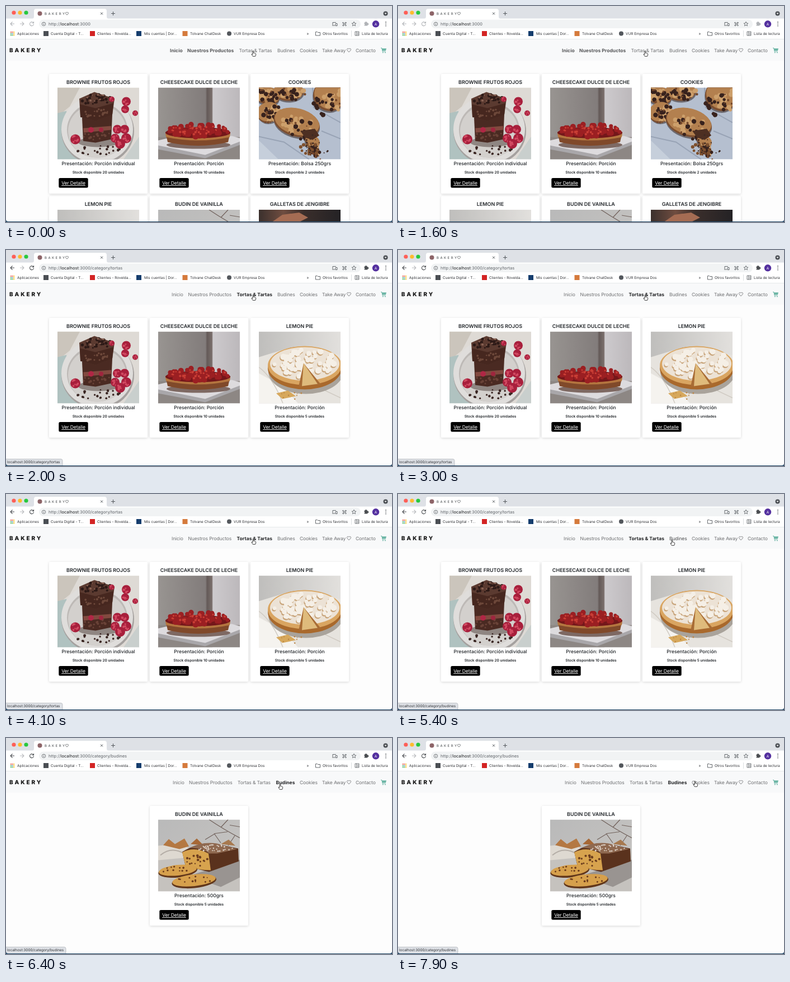
Animation of 690 by 388 pixels, one loop 8000 ms. Source, as an HTML page:

```html
<!DOCTYPE html>
<html lang="es">
<head>
<meta charset="utf-8">
<title>Bakery</title>
<style>
  html, body { margin: 0; width: 100%; height: 100%; overflow: hidden; background: #fdfdfd; }
  svg { display: block; }
  #stage { width: 690px; height: 388px; }
  text { font-family: Inter, Roboto, sans-serif; text-rendering: geometricPrecision; fill: #212529; white-space: pre; }
  .tab { font-size: 6px; letter-spacing: .4px; fill: #3c4043; }
  .url { font-size: 7.5px; letter-spacing: .02px; fill: #5f6368; }
  .host { fill: #202124; }
  .small { font-size: 6.45px; fill: #303236; }
  .brand { font-size: 10px; font-weight: 800; letter-spacing: 2.9px; fill: #111; }
  .nav { font-size: 8.5px; letter-spacing: -.11px; fill: #6f7072; }
  .bold { font-weight: 700; letter-spacing: .04px; fill: #555658; }
  .active { font-weight: 700; letter-spacing: .04px; fill: #222325; }
  .hover { fill: #4b4c4e; }
  .loading { font-size: 16.4px; font-weight: 500; letter-spacing: -.3px; }
  .title { font-size: 9px; font-weight: 600; }
  .size { font-size: 8.6px; font-weight: 500; letter-spacing: -.03px; }
  .stock { font-size: 6.5px; font-weight: 600; }
  .button { font-size: 8.5px; letter-spacing: -.1px; fill: #fff; text-decoration: underline; }
  .title, .size, .stock, .button, .loading { text-anchor: middle; }
</style>
</head>
<body>
<svg id="stage" viewBox="0 0 690 388">
  <defs>
    <filter id="shadow" x="-10%" y="-10%" width="120%" height="120%">
      <feDropShadow dx="0" dy="1" stdDeviation="2.2" flood-opacity=".15"/>
    </filter>
    <linearGradient id="wall">
      <stop stop-color="#989491"/><stop offset=".58" stop-color="#827c7b"/>
      <stop offset=".6" stop-color="#645a58"/><stop offset=".66" stop-color="#7b706d"/>
      <stop offset=".67" stop-color="#cdcacd"/><stop offset="1" stop-color="#bcb8bb"/>
    </linearGradient>
    <linearGradient id="grey" y2="1"><stop stop-color="#b9b9b9"/><stop offset="1" stop-color="#c9c7c4"/></linearGradient>
    <linearGradient id="linen"><stop stop-color="#bfbebc"/><stop offset="1" stop-color="#e2e0dd"/></linearGradient>
    <linearGradient id="kitchen">
      <stop stop-color="#3b302d"/><stop offset=".3" stop-color="#6f4d40"/>
      <stop offset=".55" stop-color="#3a2e2b"/><stop offset="1" stop-color="#242225"/>
    </linearGradient>
  </defs>
  <g id="chrome"></g>
  <g id="page"></g>
  <g id="status"></g>
  <path d="M0 383q0 4 4 4H686q4 0 4-4V388H0Z" fill="#1d4464"/>
  <path id="cursor" d="M-1.600 1.500V-4q0-1 .8-1t.8 1V-1q1.200-.4 1.400.4 1.100-.3 1.300.5 1.200-.1 1.200 1V2.500l-1 2.500h-4.300L-3.700 1.500q0-1 .9-.7Z" fill="#fff" stroke="#111" stroke-width=".8"/>
</svg>
<script>
const $ = id => document.getElementById(id);
const text = (x, y, s, cls) => `<text x="${x}" y="${y}" class="${cls}">${s.replace('&', '&amp;')}</text>`;
const rect = (x, y, w, h, fill, r = 0) => `<rect x="${x}" y="${y}" width="${w}" height="${h}" rx="${r}" fill="${fill}"/>`;
const oval = (x, y, rx, ry, fill, extra = '') => `<ellipse cx="${x}" cy="${y}" rx="${rx}" ry="${ry}" fill="${fill}" ${extra}/>`;
const disc = (x, y, r, fill) => oval(x, y, r, r, fill);
const shape = (d, fill) => `<path d="${d}" fill="${fill}"/>`;
const line = (d, stroke, w = 1) => `<path d="${d}" fill="none" stroke="${stroke}" stroke-width="${w}"/>`;
const at = (x, y, s, more = '') => `<g transform="translate(${x} ${y}) ${more}">${s}</g>`;
const heart = (x, y, color, scale = 1) =>
  at(x, y, line('M0 6.6L-2.9 3.500C-4.800 1-1.600-1.300 0 1.200C1.600-1.300 4.800 1 2.900 3.500Z', color, .9), `scale(${scale})`);
const rand = n => { const v = Math.sin(n * 127.1) * 43758.5453; return v - Math.floor(v); };

// Dots spread evenly over an ellipse
const scatter = (count, x, y, rx, ry, r, fill) => Array.from({ length: count }, (_, i) => {
  const a = rand(i + x) * 2 * Math.PI, d = Math.sqrt(rand(i + y + 50));
  return disc(x + rx * d * Math.cos(a), y + ry * d * Math.sin(a), r * (.6 + .6 * rand(i + 9)), fill);
}).join('');

const cookie = (x, y, rx, ry, tilt = 0) => at(x, y,
  oval(1, 4, rx, ry, '#6d6a70') + oval(0, 1, rx, ry, '#7d4f30') + oval(0, -1, rx * .97, ry * .94, '#b3804f') +
  scatter(22, x / 9, y / 9, rx * .8, ry * .75, 4, '#cda06c') + scatter(16, y / 7, x / 7, rx * .8, ry * .75, 3.6, '#38221d') +
  scatter(8, x / 5, y / 5, rx * .8, ry * .75, 2, '#75482c'), `rotate(${tilt})`);
const berry = (x, y, r) => disc(x, y, r, '#a81f3c') + scatter(9, x, y, r * .7, r * .7, r * .2, '#d24a62');
const slice = (x, y, rx, ry) => oval(x, y + 2, rx, ry, '#62371b', `transform="rotate(-6 ${x} ${y})"`) +
  oval(x, y, rx - 1, ry - 1.5, '#d6a04c', `transform="rotate(-6 ${x} ${y})"`) +
  scatter(12, x, y, rx * .8, ry * .6, 1.6, '#6b3a1c');

// Each photo fills a 146 x 129 box
const photos = {
  brownie: () => rect(0, 0, 146, 129, '#dedad5') + shape('M0 0H40L22 34 0 52Z', '#cbc5bc') +
    shape('M0 46L16 42 40 129H0Z', '#b0c2c0') + shape('M118 129L146 88V129Z', '#c9cfcd') +
    oval(72, 78, 65, 61, '#a5a19f') + oval(71, 75, 64, 60, '#dfdddb') +
    oval(71, 76, 54, 50, '#bdb9b6') + oval(71, 78, 52, 48, '#d3d0cd') + oval(73, 98, 36, 9, '#8f8682') +
    shape('M44 54L98 49 96 93 68 99 46 96Z', '#4a2a22') + shape('M46 73L96 69V76L47 81Z', '#82493f') +
    shape('M39 20L66 8 102 20 98 49 68 60 41 53Z', '#5b3a30') + shape('M40 30L68 37 100 28 98 49 68 60 41 53Z', '#46271f') +
    scatter(26, 69, 22, 27, 10, 2.5, '#2d1a17') + scatter(12, 70, 20, 24, 8, 1.5, '#8a6354') +
    scatter(18, 70, 46, 25, 9, 2, '#6d483a') + scatter(18, 70, 86, 24, 9, 2, '#694237') +
    scatter(24, 74, 112, 42, 9, 2.1, '#3a2623') + disc(60, 76, 5, '#b02745') + disc(78, 76, 4, '#9f253e') +
    [[32, 93, 9], [107, 75, 8], [120, 75, 8], [103, 91, 8], [123, 91, 9], [112, 101, 9], [123, 25, 8], [121, 39, 7], [97, 21, 5], [139, 46, 5]]
      .map(b => berry(...b)).join(''),
  cheesecake: () => rect(0, 0, 146, 129, 'url(#wall)') + rect(0, 89, 146, 40, '#8d8784') +
    shape('M0 101L146 95V103L84 127 0 111Z', '#a9a7aa') + shape('M0 95L34 87H132L146 91V97L84 121 0 104Z', '#dddbde') +
    oval(72, 103, 57, 7, '#7e6963') + shape('M13 80H129L125 98Q72 111 17 98Z', '#80492a') +
    shape('M13 82H129L128 89Q72 101 14 89Z', '#b4753f') +
    oval(71, 81, 58, 10, '#74171a') + scatter(80, 71, 77, 55, 11, 4.5, '#9b1f22') + scatter(34, 71, 75, 51, 9, 2, '#c93e35'),
  cookies: () => rect(0, 0, 146, 129, '#b5bfcf') +
    line('M0 88L45 98 90 129M96 0L98 36 146 63M112 78L146 92', '#98a3b5', 2) + shape('M0 95L35 129H0Z', '#c6cfdb') +
    cookie(53, 6, 27, 17) + cookie(14, 13, 24, 16, 20) + cookie(126, 14, 29, 27, 30) +
    cookie(17, 44, 21, 18, -20) + cookie(68, 62, 42, 25, 15) + cookie(96, 96, 14, 10, 35) +
    shape('M74 78L100 74 108 86 96 94 83 90Z', '#4d2f22') + scatter(16, 92, 110, 20, 10, 3, '#7e512f') +
    scatter(24, 104, 104, 24, 20, 1.4, '#3d2923'),
  lemon: () => rect(0, 0, 146, 129, 'url(#linen)') + shape('M0 46L52 30 146 42V129H0Z', '#e6e3de') +
    shape('M0 75L42 98 70 129H0Z', '#f5f3ef') + line('M0 64Q25 82 43 129M110 102L146 119', '#cfcac2', 1.5) +
    oval(66, 34, 17, 6, '#a96035') + oval(67, 33, 13, 4, '#db8448') + oval(94, 37, 10, 5, '#bd6e39') +
    oval(84, 72, 67, 40, '#a9a39b') + oval(82, 66, 66, 38, '#a9692c') + oval(82, 61, 66, 35, '#d9a561') +
    oval(82, 58, 62, 30, '#ece2d5') + scatter(70, 82, 58, 56, 25, 5, '#c8a47a') + at(1, -2, scatter(70, 82, 58, 56, 25, 4.8, '#f5efe6')) +
    shape('M80 57L71 99 111 95Z', '#a86c35') + shape('M80 57L77 98 105 94Z', '#dfbb7c') +
    shape('M31 111L52 106 66 116 42 121Z', '#d7a85c') + scatter(10, 59, 115, 24, 7, 1.2, '#b98344'),
  budin: () => rect(0, 0, 146, 129, 'url(#grey)') + rect(0, 58, 146, 71, '#c5c2be') +
    line('M146 33Q116 17 91 0M124 22L102 25 84 36M112 14L125 0M137 29L125 47M100 25L112 42M146 13L128 10', '#70615b', 1.2) +
    shape('M0 47L44 43 58 55 55 68 0 73Z', '#ded9d1') + line('M4 64Q24 47 48 62', '#b5aea7', 2) +
    shape('M9 46L19 35 30 44 47 34 55 48 38 53Z', '#b47842') + shape('M58 44L69 34 81 46Z', '#a66836') +
    shape('M112 44L126 36 138 47Z', '#a7794f') + shape('M55 101L146 72V104L112 121Z', '#999491') +
    shape('M43 58Q73 40 101 43L143 52 144 75 91 94 49 84Z', '#5a321d') +
    shape('M43 59Q65 47 90 61L94 91Q70 91 49 83Z', '#d7a34e') + scatter(17, 69, 73, 20, 12, 2, '#6c3d1e') +
    shape('M57 51Q79 39 105 43L141 53 105 61 91 61Q80 51 57 51Z', '#8f6950') +
    scatter(38, 102, 51, 34, 7, 1.3, '#e0d5cb') + slice(35, 91, 35, 11) + slice(64, 109, 40, 12),
  jengibre: () => rect(0, 0, 146, 129, 'url(#kitchen)') + shape('M22 23L42 9 72 5 88 14 70 23Z', '#a56c53'),
};

const products = {
  brownie: ['BROWNIE FRUTOS ROJOS', 'Porción individual', 20],
  cheesecake: ['CHEESECAKE DULCE DE LECHE', 'Porción', 10],
  cookies: ['COOKIES', 'Bolsa 250grs', 2],
  lemon: ['LEMON PIE', 'Porción', 5],
  budin: ['BUDIN DE VAINILLA', '500grs', 5],
  jengibre: ['GALLETAS DE JENGIBRE', 'Bolsa 250grs', 5],
};

function card(id, slot) {
  const [title, size, stock] = products[id];
  return at(77 + slot % 3 * 180, 122 + Math.floor(slot / 3) * 219.5,
    `<g filter="url(#shadow)">${rect(0, 0, 176, 215, '#fff', 2)}</g>` +
    text(88, 17.7, title, 'title') +
    `<svg x="15" y="24.500" width="146" height="129">${photos[id]()}</svg>` +
    text(88, 164, 'Presentación: ' + size, 'size') +
    text(88, 178.6, `Stock disponible ${stock} unidades`, 'stock') +
    rect(17.3, 187, 52.4, 17.5, '#000', 2.5) + text(43.5, 199, 'Ver Detalle', 'button'));
}

const routes = {
  home: { path: '', starts: [293, 324, 416.5, 485], cards: ['brownie', 'cheesecake', 'cookies', 'lemon', 'budin', 'jengibre'] },
  tortas: { path: '/category/tortas', starts: [296, 325.5, 412.5, 485], active: 2, cards: ['brownie', 'cheesecake', 'lemon'] },
  budines: { path: '/category/budines', starts: [298, 327, 414, 482.5], active: 3, cards: [, 'budin'] },
};

// Browser buttons stay pale until the window is clicked
function drawButtons(focused) {
  const ink = focused ? '#4a4d51' : '#b0b3b7';
  return line('M15 32H8M11.500 28.500L8 32 11.500 35.500', ink, 1.1) +
    line('M48.800 30A3.500 3.500 0 1 0 49.500 32.500M49.500 28V30.700H46.800', ink, 1.1) +
    rect(640.5, 29.5, 6, 6, ink, .8) + disc(643.5, 29.3, 1.4, ink) + disc(647, 32.5, 1.4, ink) + disc(640.3, 33, 1, '#fff');
}

function drawPage(name, loading, hovered) {
  const { path, starts, active, cards } = routes[name];
  const labels = ['Inicio', 'Nuestros Productos', 'Tortas & Tartas', 'Budines', 'Cookies', 'Take Away', 'Contacto'];
  const links = labels.map((label, i) => {
    const look = i === active ? 'active' : name === 'home' && i < 2 ? 'bold' : i === hovered ? 'hover' : '';
    return text([...starts, 525, 565, 625][i], 82.6, label, 'nav ' + look);
  });
  return drawButtons(name !== 'home') +
    text(76, 35.1, `http://<tspan class="host">localhost</tspan>:3000${path}`, 'url') + links.join('') +
    (loading ? text(345, 163, 'Cargando...', 'loading') : cards.map(card).join(''));
}

function drawChrome() {
  const ink = '#54585d';
  const marks = [
    [67, 80, '#4b4f54', 'Cuenta Digital - T...'], [150, 163, '#d32424', 'Clientes - Rovelda...'],
    [233, 247, '#153d6d', 'Mis cuentas | Dor...'], [315.5, 329, '#d57a3c', 'Tolvane ChatDesk'],
  ];
  const apps = ['#ea4335', '#ea4335', '#fbbc04', '#34a853', '#4285f4', '#fbbc04', '#34a853', '#34a853', '#fbbc04'];
  return rect(0, 0, 690, 24, '#dee1e6') + shape('M46 23Q50 23 50 19V9Q50 5 54 5H176Q180 5 180 9V19Q180 23 184 23Z', '#fff') +
    rect(0, 22.5, 690, 37, '#fff') +
    disc(14, 12, 3.6, '#fe5f57') + disc(25, 12, 3.6, '#febb2e') + disc(36, 12, 3.6, '#28c83f') +
    disc(60.5, 13.5, 4, '#8d6468') + text(69, 15.8, 'B A K E R Y', 'tab') + heart(109, 11.2, '#3c4043', .75) +
    line('M169 11.500l4 4m0-4l-4 4M188 13.500h7m-3.500-3.500v7', ink, 1) +
    disc(678.5, 13.5, 4, '#4c5055') + shape('M676.500 12.500h4l-2 2.500Z', '#fff') +
    line('M25 32h7m-3.500-3.500l3.500 3.500-3.500 3.500', '#b8babd', 1.1) +
    rect(59, 24.5, 575, 15.5, '#f1f3f4', 7.75) +
    oval(67.5, 32.3, 3.2, 3.2, 'none', `stroke="${ink}" stroke-width=".8"`) + line('M67.500 31.800V34M67.500 30.300v.8', ink, .8) +
    line('M584 34V29.500h6M583 35h5M589 31.500h3v4h-3Z', ink, .9) +
    line('M602 29.500h1.500m2.500 0h2M602 35.500h2m2.500 0h1.500M602 29v2.500m6-2.500v2.500M602 33.500v2m6-2v2M603.500 31h3v3h-3Z', ink, .9) +
    line('M622 28.300l1.100 2.600 2.800.2-2.100 1.800.7 2.800-2.500-1.500-2.500 1.500.7-2.800-2.100-1.800 2.800-.2Z', ink, .8) +
    disc(661, 32.3, 6.2, '#54309f') +
    `<text x="661" y="34.600" font-size="6.300" text-anchor="middle" style="fill:#fff">A</text>` +
    [29, 32.3, 35.6].map(y => disc(679, y, .9, ink)).join('') +
    apps.map((color, i) => rect(8 + i % 3 * 2.7, 46 + Math.floor(i / 3) * 2.7, 1.8, 1.8, color, .3)).join('') +
    text(20, 52, 'Aplicaciones', 'small') +
    marks.map(([x, tx, color, label]) => rect(x, 45, 9, 9, color) + text(tx, 52, label, 'small')).join('') +
    disc(399, 49.5, 4, '#53575c') + text(407, 52, 'VUR Empresa Dos', 'small') +
    text(537.5, 51.6, '»', 'small') + line('M553.500 46.500h3l1 1h4v5.500h-8Z', ink, .9) + text(566, 52, 'Otros favoritos', 'small') +
    line('M617.500 44v11', '#d4d6d9', .8) + line('M624 46h7v7h-7ZM626.500 46v7M628 48h2m-2 1.700h2m-2 1.700h2', ink, .8) +
    text(636, 52, 'Lista de lectura', 'small') +
    rect(0, 59, 690, 39.3, '#f8f9fa') + rect(0, 59, 690, .7, '#dfe1e4') + text(6, 83.3, 'BAKERY', 'brand') +
    heart(613, 76.2, '#6f7072') +
    at(670, 75, shape('M0 0H2L2.400 1.300H10L8.800 5.500H3.400L3.600 6.400H8.600V7.300H2.800L1.300 1H0Z', '#6bb5a5') +
      disc(3.8, 8.4, 1, '#6bb5a5') + disc(7.9, 8.4, 1, '#6bb5a5'));
}

function drawStatus(name) {
  const width = name === 'tortas' ? 101 : 107;
  return `<path d="M-1 375.500H${width - 3}q3 0 3 3V388H-1Z" fill="#dee1e6" stroke="#b4b7bb" stroke-width=".8"/>` +
    text(2, 383.2, 'localhost:3000' + routes[name].path, 'small');
}

const ease = (t, from, to) => {
  const p = Math.min(1, Math.max(0, (t - from) / (to - from)));
  return p * p * (3 - 2 * p);
};

let shown = '';
function frame() {
  const t = Math.floor(performance.now() % 8000 / 100) * 100;
  const name = t < 1800 ? 'home' : t < 5500 ? 'tortas' : 'budines';
  const loading = t >= 1800 && t < 2000 || t >= 5500 && t < 6400;
  const hovered = t >= 4700 && t < 5500 ? 3 : t === 5500 ? 2 : -1;
  const key = [name, loading, hovered].join();
  if (key !== shown) {
    shown = key;
    $('page').innerHTML = drawPage(name, loading, hovered);
    $('status').innerHTML = name === 'home' ? '' : drawStatus(t < 4700 ? 'tortas' : 'budines');
  }
  const first = ease(t, 4300, 4700), second = ease(t, 7500, 7900);
  $('cursor').setAttribute('transform', `translate(${442.7 + 48 * first + 41 * second} ${85.4 + 2 * first - 5 * second})`);
  requestAnimationFrame(frame);
}

$('chrome').innerHTML = drawChrome();
frame();
</script>
</body>
</html>
```
